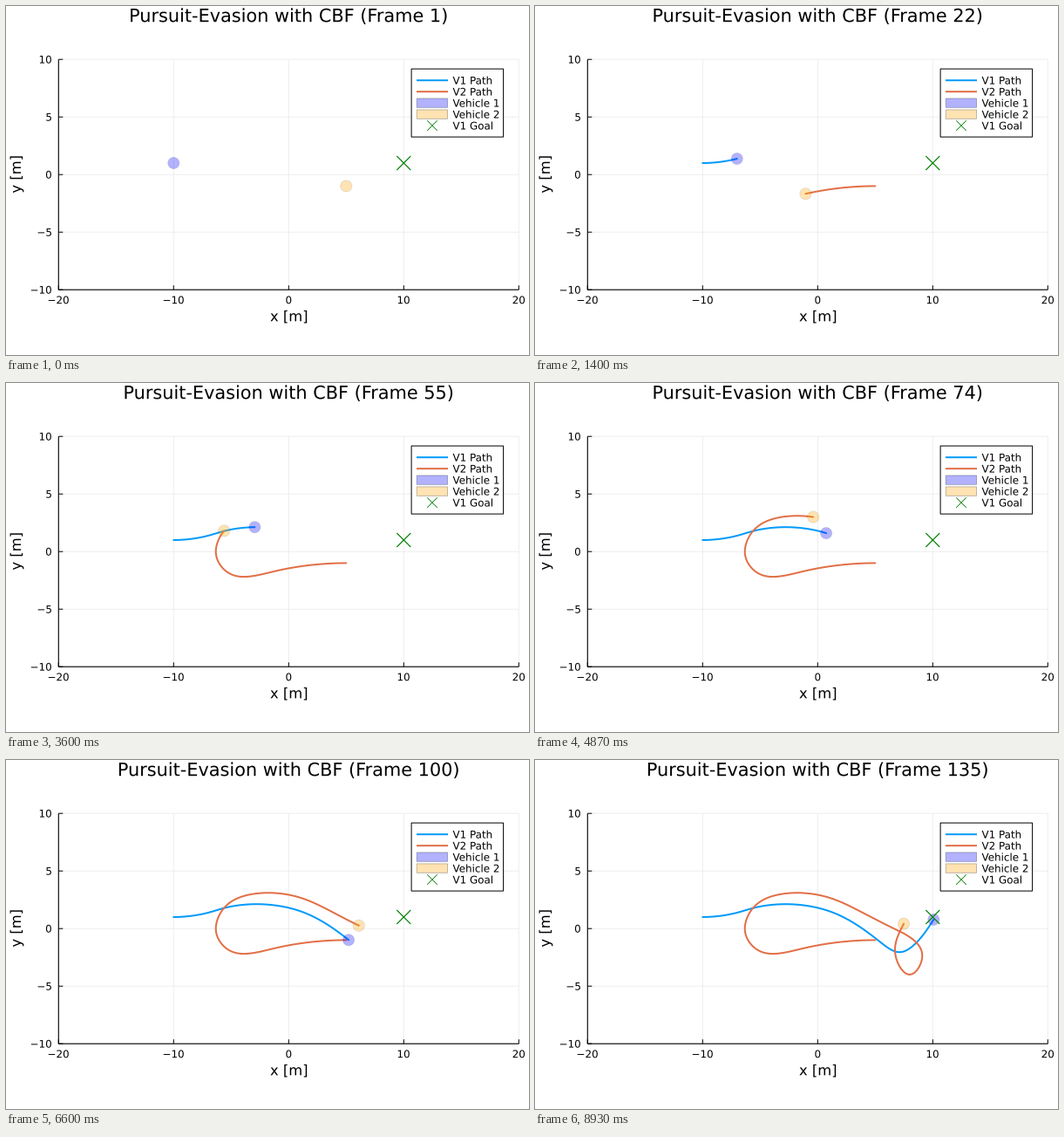
These frames come from a looping animation (600 by 400 pixels, 8.99 s). A matplotlib script:

```python
import numpy as np
import matplotlib.pyplot as plt
from matplotlib.animation import FuncAnimation
from matplotlib.patches import Circle, PathPatch, Rectangle
from matplotlib.textpath import TextPath
from matplotlib.transforms import Affine2D

W, H, DPI = 600, 400, 100
FRAMES, LOOP_MS = 135, 8990
PT = 72 / DPI

LEFT, RIGHT, TOP, BOTTOM = 60.3, 588.3, 61.2, 325.2
UNIT = (RIGHT - LEFT) / 40
SMALL, MEDIUM, LARGE = 11.9, 16.37, 20.83
BLUE, RED, GREEN = "#009afa", "#e26f46", "#008000"
FILL1, FILL2 = (0, 0, 1, 0.3), (1, 165 / 255, 0, 0.3)

# Turning points of each drive: (step, x, y) in metres
EVADER = [(0, -10, 1), (14, -7.82, 1.2), (28, -6.34, 1.57), (42, -4.88, 1.94),
          (54, -2.95, 2.12), (73, 0.74, 1.6), (99, 5.21, -0.99),
          (111, 7.14, -2.05), (119, 8.34, -1.45), (134, 10.08, 0.78)]
PURSUER = [(0, 5, -1), (21, -1.05, -1.67), (35, -4.56, -2.12),
           (42, -5.86, -1.29), (47, -6.33, -0.11), (54, -5.61, 1.8),
           (63, -3.3, 2.97), (73, -0.39, 3), (99, 6.1, 0.26),
           (112, 9.09, -2.42), (119, 7.97, -4), (126, 6.74, -2.21),
           (134, 7.48, 0.42)]


def px(x):
    return LEFT + (x + 20) * UNIT


def py(y):
    return BOTTOM - (y + 10) * UNIT


def drive(keys, speed):
    """Cubic spline that sets off level at the given speed, one row per step."""
    keys = np.array(keys, float)
    t, p = keys[:, 0], keys[:, 1:]
    n, h = len(t), np.diff(t)
    slope = np.diff(p, axis=0) / h[:, None]
    a, b = np.eye(n), np.zeros((n, 2))
    a[0, :2] = 2 * h[0], h[0]
    b[0] = 6 * (slope[0] - (speed, 0))
    for i in range(1, n - 1):
        a[i, i - 1:i + 2] = h[i - 1], 2 * (h[i - 1] + h[i]), h[i]
        b[i] = 6 * (slope[i] - slope[i - 1])
    m = np.linalg.solve(a, b)
    s = np.arange(FRAMES)
    k = np.clip(np.searchsorted(t, s, side="right") - 1, 0, n - 2)
    d, hk = (s - t[k])[:, None], h[k][:, None]
    lin = slope[k] - hk * (2 * m[k] + m[k + 1]) / 6
    pos = p[k] + d * lin + d**2 * m[k] / 2 + d**3 * (m[k + 1] - m[k]) / (6 * hk)
    return np.column_stack([px(pos[:, 0]), py(pos[:, 1])])


plt.rcParams["font.family"] = "DejaVu Sans"
fig = plt.figure(figsize=(W / DPI, H / DPI), dpi=DPI, facecolor="white")
ax = fig.add_axes([0, 0, 1, 1])
ax.set_xlim(0, W)
ax.set_ylim(H, 0)
ax.axis("off")


def line(xs, ys, color, width, z, cap="butt"):
    return ax.plot(xs, ys, color=color, lw=width * PT, zorder=z, snap=False,
                   solid_capstyle=cap, solid_joinstyle="round")[0]


def glyphs(x, y, s, size, align=0.5, angle=0):
    """Text outline with its baseline on y; align 0 is left, 1 is right."""
    path = TextPath((0, 0), s, size=size)
    box = path.get_extents()
    shift = -(box.x0 + align * box.width)
    place = Affine2D().translate(shift, 0).scale(1, -1)
    return place.rotate_deg(angle).translate(x, y).transform_path(path)


def text(*args, **kw):
    patch = PathPatch(glyphs(*args, **kw), fc="black", lw=0, zorder=12)
    return ax.add_patch(patch)


def cross(x, y, r, width, z):
    for k in (-r, r):
        line([x - r, x + r], [y - k, y + k], GREEN, width, z)


def number(v):
    return str(v).replace("-", "\u2212")


def draw_axes():
    for v in range(-20, 21, 10):
        x = px(v)
        line([x, x], [TOP, BOTTOM], "#ececec", 0.9, 1)
        line([x, x], [BOTTOM, BOTTOM - 5], "black", 1, 3)
        text(x, 341.2, number(v), SMALL)
    for v in range(-10, 11, 5):
        y = py(v)
        line([LEFT, RIGHT], [y, y], "#ececec", 0.9, 1)
        line([LEFT, LEFT + 5], [y, y], "black", 1, 3)
        text(51.9, y + 4.4, number(v), SMALL, align=1)
    line([LEFT, RIGHT], [BOTTOM, BOTTOM], "black", 1.1, 3)
    line([LEFT, LEFT], [TOP, BOTTOM], "black", 1.1, 3)
    text(px(0), 361.3, "x [m]", MEDIUM)
    text(17, py(0), "y [m]", MEDIUM, angle=-90)


def draw_legend():
    ax.add_patch(Rectangle((465.1, 72.1), 105.5, 78, fc="white", ec="black",
                           lw=PT, zorder=9, snap=False))
    names = ["V1 Path", "V2 Path", "Vehicle 1", "Vehicle 2", "V1 Goal"]
    rows = [85.2 + 12.97 * i for i in range(5)]
    for name, y in zip(names, rows):
        text(512.6, y + 4.4, name, SMALL, align=0)
    for color, y in zip((BLUE, RED), rows):
        line([471, 507], [y, y], color, 2, 10)
    for fill, y in zip((FILL1, FILL2), rows[2:]):
        ax.add_patch(Rectangle((471.2, y - 5.2), 35.4, 10.4, fc=fill, lw=0.8 * PT,
                               ec=(0, 0, 0, 0.3), zorder=10, snap=False))
    cross(489, rows[4], 5.8, 0.8, 10)


def vehicle(fill, z):
    disc = Circle((0, 0), UNIT / 2, fc=fill, ec=(0, 0, 0, 0.1),
                  lw=0.8 * PT, zorder=z)
    return ax.add_patch(disc)


draw_axes()
draw_legend()
cross(px(10), py(1), 8, 1.2, 8)
title = text(px(0), 18.2, "Pursuit", LARGE)

tracks = [drive(EVADER, 0.17), drive(PURSUER, -0.288)]
paths = [line([], [], BLUE, 2, 4, "round"), line([], [], RED, 2, 5, "round")]
discs = [vehicle(FILL1, 6), vehicle(FILL2, 7)]


def update(i):
    label = f"Pursuit-Evasion with CBF (Frame {i + 1})"
    title.set_path(glyphs(px(0), 18.2, label, LARGE))
    for track, path, disc in zip(tracks, paths, discs):
        trail = track[:i + 1] if i else track[:0]
        path.set_data(trail[:, 0], trail[:, 1])
        disc.center = tuple(track[i])
    return [title, *paths, *discs]


anim = FuncAnimation(fig, update, frames=FRAMES, interval=LOOP_MS / FRAMES,
                     init_func=lambda: update(0), repeat=True, repeat_delay=0)
plt.show()
```
